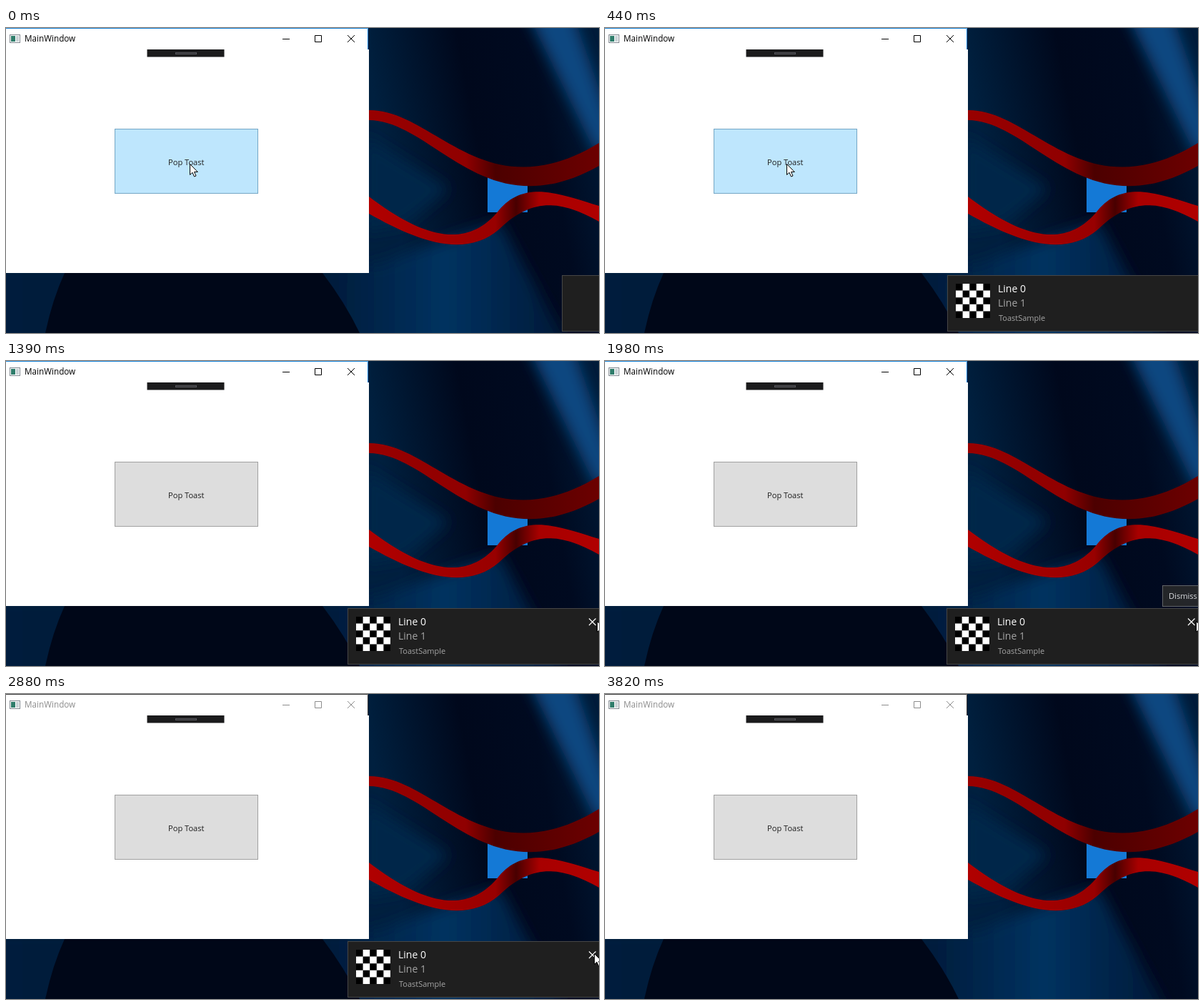
Recreate the animation shown at these times as an HTML page. Size 830x427 px, loop 3920 ms.

```html
<!DOCTYPE html>
<html lang="en">
<head>
<meta charset="utf-8">
<title>Pop Toast</title>
<style>
html, body { margin: 0; width: 100%; height: 100%; overflow: hidden; background: #00102a; }
svg { display: block; width: 830px; height: 427px; }
text { font-family: "Open Sans", "Noto Sans", sans-serif; }
</style>
</head>
<body>
<svg viewBox="0 0 830 427" xmlns="http://www.w3.org/2000/svg">
  <defs>
    <linearGradient id="sky" gradientUnits="userSpaceOnUse" x1="508" y1="60" x2="830" y2="0">
      <stop offset="0" stop-color="#00203f"/>
      <stop offset=".4" stop-color="#00081c"/>
      <stop offset=".7" stop-color="#000a20"/>
      <stop offset="1" stop-color="#001c3a"/>
    </linearGradient>
    <linearGradient id="floor" gradientUnits="userSpaceOnUse" x1="0" y1="0" x2="830" y2="0">
      <stop offset="0" stop-color="#001c3c"/>
      <stop offset=".5" stop-color="#001733"/>
      <stop offset=".74" stop-color="#003260"/>
      <stop offset="1" stop-color="#00122c"/>
    </linearGradient>
    <linearGradient id="redTop" gradientUnits="userSpaceOnUse" x1="508" y1="0" x2="830" y2="0">
      <stop offset="0" stop-color="#980000"/>
      <stop offset=".42" stop-color="#900000"/>
      <stop offset=".55" stop-color="#4c0000"/>
      <stop offset="1" stop-color="#6c0000"/>
    </linearGradient>
    <linearGradient id="redLow" gradientUnits="userSpaceOnUse" x1="508" y1="0" x2="830" y2="0">
      <stop offset="0" stop-color="#b00000"/>
      <stop offset=".55" stop-color="#980000"/>
      <stop offset=".64" stop-color="#480000"/>
      <stop offset=".74" stop-color="#a80000"/>
      <stop offset="1" stop-color="#b00000"/>
    </linearGradient>
    <filter id="soft" x="-30%" y="-30%" width="160%" height="160%"><feGaussianBlur stdDeviation="10"/></filter>
  </defs>

  <g id="wallpaper">
    <rect width="830" height="427" fill="url(#sky)"/>
    <g filter="url(#soft)">
      <path d="M-40 330H520L690 270 790 450H-40Z" fill="url(#floor)"/>
      <path d="M725 -30H790L860 170 825 175Z" fill="#0a4680"/>
      <path d="M500 150L620 225 560 275 500 285Z" fill="#00264a"/>
    </g>
    <path d="M82 343Q65 380 55 427H495Q475 385 443 343Z" fill="#000718"/>
    <rect x="674" y="202" width="56" height="56" fill="#1479d6"/>
    <path d="M508 115C600 114 670 258 830 161V193C670 283 600 130 508 129Z" fill="url(#redTop)"/>
    <path d="M508 236C570 283 640 318 690 255C725 214 770 230 830 249V271C775 240 735 238 690 282C640 325 570 295 508 260Z" fill="url(#redLow)"/>
  </g>

  <g id="window">
    <path d="M0 0H507V30H508V343H0Z" fill="#fff"/>
    <path id="edge" d="M0 .5H506.5V30" fill="none"/>
    <rect x="5.5" y="9.5" width="14" height="11" fill="#fff" stroke="#808890"/>
    <rect x="7" y="11" width="6" height="8" fill="#2f7d6b"/>
    <rect x="14" y="11" width="4" height="8" fill="#c9d2d6"/>
    <text id="title" x="26" y="19" font-size="11.7">MainWindow</text>
    <path id="glyphs" d="M387 15.5H397M432.5 10.5H441.5V19.5H432.5ZM478 10L488 20M488 10L478 20" fill="none"/>
    <rect x="197.5" y="30" width="108" height="10.5" fill="#1b1b1c"/>
    <rect x="237.5" y="34.5" width="29" height="2" fill="#2d2d30" stroke="#55555a"/>
    <rect id="button"/>
    <text x="227" y="192" font-size="11.1" fill="#1e1e1e">Pop Toast</text>
  </g>

  <g id="tip">
    <rect x="780.5" y="314.5" width="70" height="29" fill="#2b2b2b" stroke="#747474"/>
    <text x="789" y="333" font-size="11.1" fill="#fff">Dismiss</text>
  </g>

  <g id="toast">
    <rect x=".5" y="346.5" width="362" height="78" fill="#1f1f1f" stroke="#464646"/>
    <g id="content">
      <rect x="12" y="358" width="48" height="48" fill="#000"/>
      <path id="checks" fill="#fff"/>
      <text x="71" y="370" font-size="14" fill="#fff">Line 0</text>
      <text x="71" y="390" font-size="14" fill="#a5a5a5">Line 1</text>
      <text x="72" y="410" font-size="11" fill="#a5a5a5">ToastSample</text>
    </g>
    <path id="dismiss" d="M338 360.5L347.5 370M347.5 360.5L338 370" fill="none" stroke-width="1.2"/>
  </g>

  <path id="cursor" d="M.5 .5V15.5L4 12.3 6.5 18 9 17 6.5 11.5H11.3Z" fill="#fff" stroke="#000"/>
</svg>
<script>
const LOOP = 3920;
const BEAT = 141.5;

// When the state changes, in ms.
const LEAVE_BUTTON = 850, REACH_CROSS = 1090, TIP_IN = 1980;
const CLICK = 2760, TIP_OUT = 2880, CLOSE = 3030, CURSOR_OUT = 3420, BLUR = 3820;

const $ = id => document.getElementById(id);
const set = (id, attrs) => {
  for (const key in attrs) $(id).setAttribute(key, attrs[key]);
};
const show = (id, on) => set(id, { visibility: on ? "visible" : "hidden" });
const within = (t, from, to) => t >= from && t < to;

const CELL = 9.6;
let checks = "";
for (let i = 1; i < 25; i += 2) {
  checks += `M${12 + (i % 5) * CELL} ${358 + Math.floor(i / 5) * CELL}h${CELL}v${CELL}h-${CELL}z`;
}
set("checks", { d: checks });

// Cursor route: beat, x, y.
const route = [
  [0, 257, 190], [2, 254, 190], [4, 254, 190], [5, 275, 198],
  [6, 748, 368], [8, 824, 364], [9, 827, 364], [14, 827, 364],
  [18, 823, 360], [20, 823, 363], [21, 815, 370], [23, 811, 420]
];

function cursorAt(beat) {
  const next = route.findIndex(stop => stop[0] > beat);
  if (next < 0) return route[route.length - 1].slice(1);
  const [from, x0, y0] = route[next - 1];
  const [to, x1, y1] = route[next];
  const part = (beat - from) / (to - from);
  return [x0 + (x1 - x0) * part, y0 + (y1 - y0) * part].map(Math.round);
}

function drawWindow(t) {
  const active = t < CLICK || within(t, CLOSE, BLUR);
  const focused = within(t, CLOSE, BLUR);
  const hover = t < LEAVE_BUTTON;
  const ink = active ? "#000" : "#8c8c8c";
  const line = focused ? 2 : 1;
  set("edge", { stroke: active ? "#1883d7" : "#3a3a3a" });
  set("title", { fill: ink });
  set("glyphs", { stroke: ink });
  set("button", {
    x: 152 + line / 2, y: 141 + line / 2,
    width: 201 - line, height: 91 - line,
    fill: hover ? "#bee6fd" : "#ddd",
    stroke: hover ? "#74a6c5" : focused ? "#b0b0b0" : "#a0a0a0",
    "stroke-width": line
  });
}

function drawToast(t, held) {
  const x = Math.round(478 + 300 * Math.exp(-held / 75));
  show("toast", t < CLOSE);
  set("toast", { transform: `translate(${x} 0)` });
  set("content", { opacity: Math.min(1, held / 400) });
  set("dismiss", {
    opacity: t < LEAVE_BUTTON ? 0 : 1,
    stroke: t < REACH_CROSS ? "#929292" : "#fff"
  });
  show("tip", within(t, TIP_IN, TIP_OUT));
  set("tip", { opacity: t < TIP_IN + 150 ? .85 : 1 });
}

function draw(t) {
  const beat = Math.floor(t / BEAT);
  drawWindow(t);
  drawToast(t, beat * BEAT);
  show("cursor", t < CURSOR_OUT);
  set("cursor", { transform: `translate(${cursorAt(beat)})` });
}

const began = performance.now();
function tick() {
  draw((performance.now() - began) % LOOP);
  requestAnimationFrame(tick);
}
tick();
</script>
</body>
</html>
```
